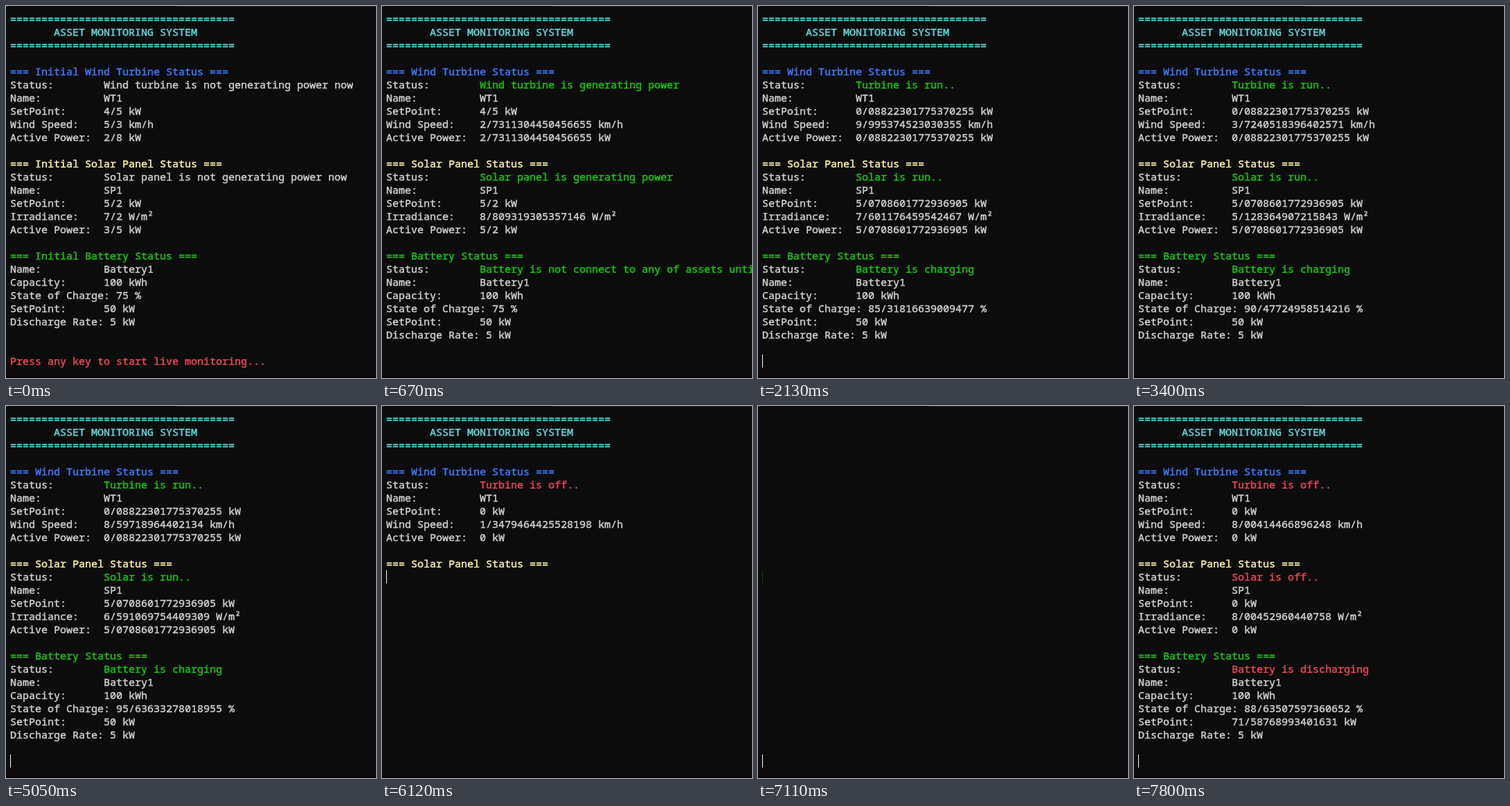
Write an HTML page with a canvas that moves like this. It is 534x537 px and loops after 8000 ms.

```html
<!DOCTYPE html>
<html>
<head>
<meta charset="utf-8">
<style>
  html, body { margin: 0; width: 100%; height: 100%; overflow: hidden; background: #0c0c0c; }
  canvas { display: block; }
</style>
</head>
<body>
<canvas id="stage" width="534" height="537"></canvas>
<script>
const ctx = document.getElementById('stage').getContext('2d');
const LOOP = 8000, LEFT = 6, TOP = 9, ROW = 19, BASELINE = 15;
const C = {
  text: '#cccccc', cyan: '#61d6d6', blue: '#3b78ff',
  yellow: '#f9f1a5', green: '#16c60c', red: '#e74856'
};

const line = (text, color = C.text) => [[text, color]];
const field = (label, value, color = C.text) => [[label.padEnd(15), C.text], [value, color]];
const rule = line('='.repeat(36), C.cyan);
const blank = [];

// wind: [status, set point, speed, power], solar: the same with irradiance,
// battery: [status or null, charge, set point]
function screen({ wind, solar, battery, color = C.green, prefix = '' }) {
  const title = (name, tint) => line(`=== ${prefix}${name} Status ===`, tint);
  return [
    rule, line('       ASSET MONITORING SYSTEM', C.cyan), rule, blank,
    title('Wind Turbine', C.blue),
    field('Status:', wind[0], color),
    field('Name:', 'WT1'),
    field('SetPoint:', wind[1] + ' kW'),
    field('Wind Speed:', wind[2] + ' km/h'),
    field('Active Power:', wind[3] + ' kW'), blank,
    title('Solar Panel', C.yellow),
    field('Status:', solar[0], color),
    field('Name:', 'SP1'),
    field('SetPoint:', solar[1] + ' kW'),
    field('Irradiance:', solar[2] + ' W/m²'),
    field('Active Power:', solar[3] + ' kW'), blank,
    title('Battery', C.green),
    ...(battery[0] ? [field('Status:', battery[0], color)] : []),
    field('Name:', 'Battery1'),
    field('Capacity:', '100 kWh'),
    line(`State of Charge: ${battery[1]} %`),
    field('SetPoint:', battery[2] + ' kW'),
    line('Discharge Rate: 5 kW')
  ];
}

const TURBINE = '0/08822301775370255', PANEL = '5/0708601772936905';
const running = (speed, light, charge) => screen({
  wind: ['Turbine is run..', TURBINE, speed, TURBINE],
  solar: ['Solar is run..', PANEL, light, PANEL],
  battery: ['Battery is charging', charge, '50']
});
const stopped = (speed, light, charge, setPoint) => screen({
  color: C.red,
  wind: ['Turbine is off..', '0', speed, '0'],
  solar: ['Solar is off..', '0', light, '0'],
  battery: ['Battery is discharging', charge, setPoint]
});

const initial = [...screen({
  prefix: 'Initial ', color: C.text,
  wind: ['Wind turbine is not generating power now', '4/5', '5/3', '2/8'],
  solar: ['Solar panel is not generating power now', '5/2', '7/2', '3/5'],
  battery: [null, '75', '50']
}), blank, blank, line('Press any key to start live monitoring...', C.red)];

const started = screen({
  wind: ['Wind turbine is generating power', '4/5', '2/7311304450456655', '2/7311304450456655'],
  solar: ['Solar panel is generating power', '5/2', '8/809319305357146', '5/2'],
  battery: ['Battery is not connect to any of assets until run', '75', '50']
});

const firstStop = stopped('1/3479464425528198', '3/716240958314072', '94/71524578672172', '60/79384496700816');
const secondStop = stopped('8/00414466896248', '8/00452960440758', '88/63507597360652', '71/58768993401631');

const screens = [
  [0, initial],
  [70, []],
  [140, started],
  [1190, running('6/482917350264718', '4/2163905827416093', '80/15908319504739')],
  [2130, running('9/995374523030355', '7/601176459542467', '85/31816639009477')],
  [3130, running('3/7240518396402571', '5/128364907215843', '90/47724958514216')],
  [4130, running('8/59718964402134', '6/591069754409309', '95/63633278018955')],
  [5130, running('5/306182947150263', '8/274019563821647', '100/79541597523693')],
  [6120, firstStop.slice(0, 12)],
  [6190, firstStop],
  [7110, []],
  [7180, secondStop]
];

// time and row of the caret; -1 hides it
const carets = [
  [0, -1], [70, 26], [670, -1], [1130, 26], [1190, -1], [1740, 26], [2330, -1],
  [2860, 26], [3400, -1], [3990, 26], [4520, -1], [5050, 26], [5590, -1],
  [6120, 12], [6190, -1], [6720, 26], [7250, -1], [7800, 26]
];

const at = (track, t) => track.findLast(([start]) => start <= t)[1];

function rect(color, x, y, w, h) {
  ctx.fillStyle = color;
  ctx.fillRect(x, y, w, h);
}

function draw(t) {
  rect('#0c0c0c', 0, 0, 534, 537);
  rect('#333333', 0, 0, 4, 1);
  rect('#333333', 247, 0, 287, 1);
  rect('#0c0508', 0, 533, 534, 4);

  if (t >= 7110 && t < 7180) rect('#123a10', LEFT, TOP + 12 * ROW, 1, ROW);

  // a thin outline gives the sturdier terminal weight
  ctx.font = '500 15px "Noto Sans Mono", monospace';
  ctx.lineWidth = 0.5;
  ctx.lineJoin = 'round';
  at(screens, t).forEach((spans, row) => {
    let x = LEFT;
    const y = TOP + row * ROW + BASELINE;
    for (const [text, color] of spans) {
      ctx.fillStyle = ctx.strokeStyle = color;
      ctx.fillText(text, x, y);
      ctx.strokeText(text, x, y);
      x += ctx.measureText(text).width;
    }
  });

  const caret = at(carets, t);
  if (caret >= 0) rect('#ffffff', LEFT, TOP + caret * ROW, 1, ROW);
}

function tick() {
  draw(performance.now() % LOOP);
  requestAnimationFrame(tick);
}
tick();
</script>
</body>
</html>
```
